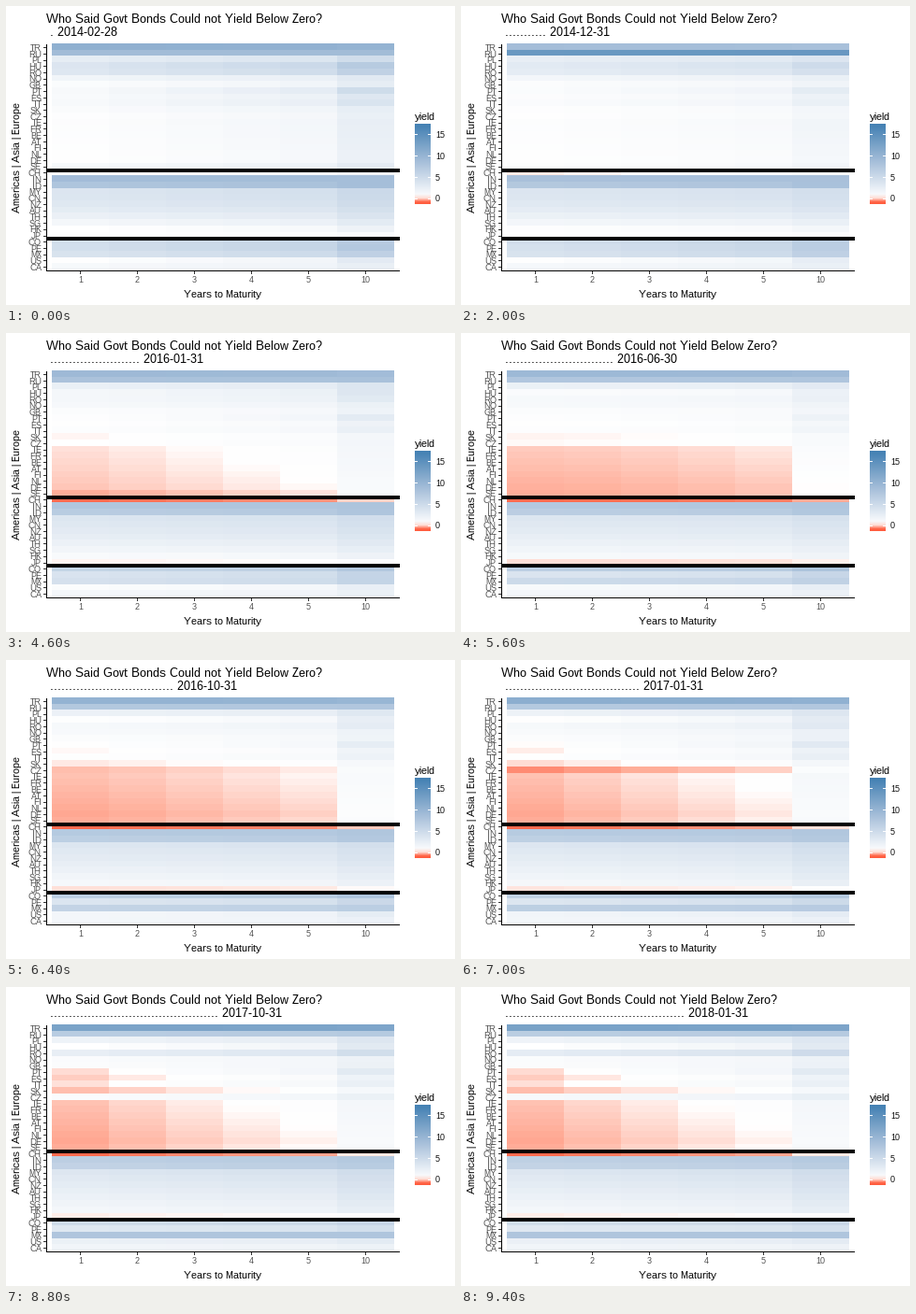
Write a matplotlib script that moves like this. It is 480 by 320 pixels and loops after 9600 ms.

```python
import numpy as np
import matplotlib.pyplot as plt
from matplotlib.animation import FuncAnimation
from matplotlib.colors import LinearSegmentedColormap, Normalize
from matplotlib.patches import Rectangle

plt.rcParams.update({
    "font.family": "Liberation Sans",
    "text.hinting": "native",
    "text.hinting_factor": 1,
    "text.kerning_factor": 6,
})

W, H, DPI = 480, 320, 100
MONTHS = 48
STEP_MS = 200

# Plot panel in pixels, y pointing down
LEFT, RIGHT, TOP, BOTTOM = 43, 420.8, 40.6, 283.6
ROWS = ("TR RU PL HU RO NO GB PT ES IT SK CZ IE FR BE AT FI NL DE SE CH "
        "IN ID MY CN NZ AU TH SG HK JP CO PE MX US CA").split()
YEARS = np.array([1, 2, 3, 4, 5, 10])
COL_W = (RIGHT - LEFT) / (len(YEARS) + 0.2)
ROW_H = (BOTTOM - TOP) / (len(ROWS) + 0.2)
LOW, HIGH = -1.25, 17.5

month = np.arange(MONTHS)


def ease(a, b, start, end):
    """Smooth move from a to b between two months."""
    x = np.clip((month - start) / (end - start), 0, 1)
    return a + (b - a) * x * x * (3 - 2 * x)


def line(a, b):
    return np.linspace(a, b, MONTHS)


def bump(centre, width):
    return np.exp(-((month - centre) / width) ** 2)


# Curves flatten and bend in mid-2016
flat = bump(28, 5)
slope = ((YEARS - 1) / 9) ** (1 + 0.6 * flat[:, None])
premium = (1.4 + 0.4 * bump(0, 5) - 0.5 * bump(12, 5)) * (1 - 0.5 * flat)

curves = {}


def add(code, short, spread=premium):
    """Store a months x maturities table: 1-year yield plus term premium."""
    spread = np.broadcast_to(spread, MONTHS)
    curves[code] = short[:, None] + spread[:, None] * slope


# Europe outside the euro, and neighbours
add("TR", ease(8.5, 12.8, 20, 47) + 2.2 * bump(0, 6) + 2 * bump(18, 5), -0.4)
add("RU", line(8.8, 6.7) + 6.5 * bump(12, 6.5), line(0, 0.3))
add("PL", line(2.4, 1.5), 1.2 * premium)
add("HU", ease(3.4, 0, 0, 36), 2 * premium)
add("RO", ease(3.2, 0.8, 0, 28) + ease(0, 1.7, 36, 47), 1.6 * premium)
add("NO", line(1.3, 0.4), 0.9 * premium)
add("GB", line(0.4, 0.3), 1.1 * premium)
add("CZ", ease(0.15, 0, 0, 20) + ease(0, 0.75, 40, 47) - 0.9 * bump(35, 4))
add("SE", ease(0.8, -0.65, 0, 24))
add("CH", ease(0, -1.15, 7, 20), 0.7 * premium)

# Euro periphery turns negative late, the core early
late = ease(0.6, 0.05, 0, 18) + ease(0, -0.45, 26, 46)
for code, gap, scale in [("PT", 0.12, 2.2), ("ES", 0, 1.4), ("IT", 0.15, 1.6), ("SK", -0.12, 1)]:
    add(code, late + gap, scale * premium)
early = ease(0.15, -0.6, 7, 33)
core = ["IE", "FR", "BE", "AT", "FI", "NL", "DE"]
for code, gap in zip(core, np.linspace(0.12, -0.09, len(core))):
    add(code, early + gap, premium + gap)

# Asia and Pacific
add("IN", line(8.9, 6.3), line(-0.2, 0.8))
add("ID", line(7.8, 5.8), 0.9)
pacific = ["MY", "CN", "NZ", "AU", "TH", "SG", "HK"]
for code, k in zip(pacific, np.linspace(0, 1, len(pacific))):
    add(code, ease(3.4 * (1 - k * k), 3.3 - 2.3 * k, 0, 40), 0.9 * premium)
add("JP", ease(0.08, -0.25, 18, 28) + ease(0, 0.12, 30, 42), 0.2 * premium)

# Americas
narrowing = line(2.6, 0.7)
add("CO", 4.3 + 2.2 * bump(30, 10), narrowing)
add("PE", line(4.3, 3), narrowing + 0.4)
add("MX", ease(3.7, 7.7, 18, 45), ease(2.5, 0, 10, 44))
add("US", ease(0.1, 1.9, 15, 47), narrowing)
add("CA", line(0.8, 1.3), 0.5 * narrowing)

yields = np.stack([curves[code] for code in ROWS], axis=1)


def at(value):
    return (value - LOW) / (HIGH - LOW)


def rgb(*channels):
    return tuple(c / 255 for c in channels)


cmap = LinearSegmentedColormap.from_list("yield", [
    (0, rgb(255, 94, 64)),
    (at(LOW / 2), rgb(255, 176, 156)),
    (at(0), rgb(255, 255, 255)),
    (at(HIGH / 2), rgb(165, 190, 217)),
    (1, rgb(70, 130, 180)),
], N=4096)
norm = Normalize(LOW, HIGH)

fig = plt.figure(figsize=(W / DPI, H / DPI), dpi=DPI, facecolor="white")
ax = fig.add_axes([0, 0, 1, 1])
ax.axis("off")


def label(x, y, text, size, color="black", **kw):
    return ax.text(x, y, text, fontsize=size * 72 / DPI, color=color, **kw)


def box(x0, y0, x1, y1, color="black"):
    ax.add_patch(Rectangle((x0, y0), x1 - x0, y1 - y0, fc=color, lw=0, zorder=3))


# Heat map; the half pixel makes cell edges round down
x0, x1 = LEFT + 0.1 * COL_W, RIGHT - 0.1 * COL_W
y0, y1 = TOP + 0.1 * ROW_H, BOTTOM - 0.1 * ROW_H
tiles = ax.imshow(yields[0], cmap=cmap, norm=norm,
                  extent=(x0 - 0.5, x1 - 0.5, y1 - 0.5, y0 - 0.5),
                  aspect="auto", interpolation="nearest")

# Axes, ticks and region dividers
GREY, TICK = "#4d4d4d", "#333333"
right, top, bottom = round(RIGHT), round(TOP), round(BOTTOM)
for i, code in enumerate(ROWS):
    y = y0 + (i + 0.5) * ROW_H
    box(LEFT - 3, int(y), LEFT, int(y) + 1, TICK)
    label(38, y + 3.2, code, 9, GREY, ha="right")
for i, year in enumerate(YEARS):
    x = x0 + (i + 0.5) * COL_W
    box(int(x), bottom, int(x) + 1, bottom + 3, TICK)
    label(x, 296, str(year), 9, GREY, ha="center")
box(LEFT, top, LEFT + 1, bottom)
box(LEFT, bottom - 1, right, bottom)
for first_row in (ROWS.index("CH"), ROWS.index("CO")):
    y = round(y0 + first_row * ROW_H)
    box(LEFT, y - 2, right, y + 2)

label((LEFT + RIGHT) / 2, 312, "Years to Maturity", 11, ha="center")
label(15, (TOP + BOTTOM) / 2, "Americas | Asia | Europe", 11, rotation=90,
      rotation_mode="anchor", ha="center", va="baseline")
label(LEFT, 18, "Who Said Govt Bonds Could not Yield Below Zero?", 13)
stamp = label(LEFT, 32, "", 13)

# Colour bar
BAR_L, BAR_R, BAR_T, BAR_B = 437, 454, 126, 212
label(BAR_L, 122, "yield", 11)
bins = np.linspace(HIGH, LOW, 20)[:, None]
ax.imshow(cmap(norm(bins)), extent=(BAR_L, BAR_R, BAR_B, BAR_T),
          aspect="auto", interpolation="bilinear")
for value in (0, 5, 10, 15):
    y = BAR_B - at(value) * (BAR_B - BAR_T)
    box(BAR_L, int(y), BAR_L + 3, int(y) + 1, "white")
    box(BAR_R - 3, int(y), BAR_R, int(y) + 1, "white")
    label(459, y + 3.2, str(value), 9)

ax.set_xlim(0, W)
ax.set_ylim(H, 0)


def month_end(i):
    """Last day of the i-th month counted from February 2014."""
    following = np.datetime64("2014-02") + i + 1
    return str(following.astype("datetime64[D]") - 1)


def draw(i):
    tiles.set_data(yields[i])
    stamp.set_text(f" {'.' * (i + 1)} {month_end(i)}")
    return tiles, stamp


anim = FuncAnimation(fig, draw, frames=MONTHS, interval=STEP_MS,
                     repeat=True, repeat_delay=0, blit=False)
plt.show()
```
